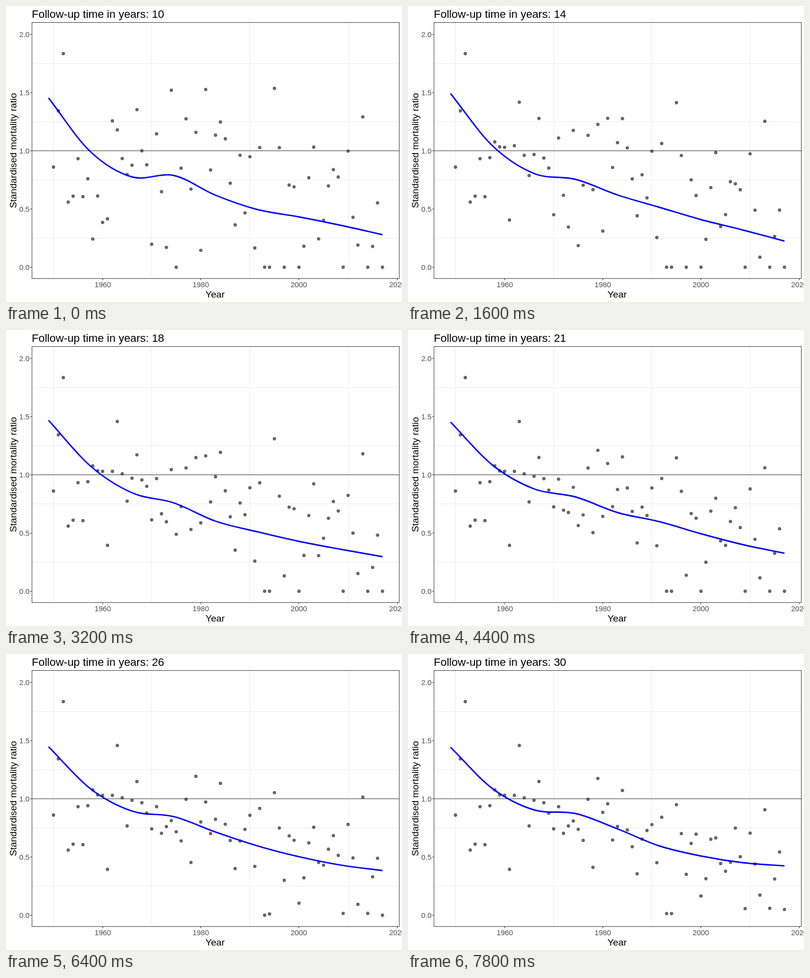
Write an HTML page that moves like this. It is 800 px wide and 600 px high and loops after 8 s.

```html
<!DOCTYPE html>
<html lang="en">
<head>
<meta charset="utf-8">
<title>Mortality ratio by follow-up time</title>
<style>
  html, body { margin: 0; width: 100%; height: 100%; overflow: hidden; background: #fff; }
  svg { display: block; width: 800px; height: 600px; font-family: "Liberation Sans", Arial, sans-serif; }
  .grid { stroke: #ebebeb; }
  .tick { stroke: #333; }
  .label { font-size: 14.93px; fill: #4d4d4d; }
  .axis { font-size: 19.2px; text-anchor: middle; }
  #title { font-size: 22.4px; }
  #trend { fill: none; stroke: #00f; stroke-width: 2.9; stroke-linejoin: round; }
</style>
</head>
<body>
<svg viewBox="0 0 800 600">
  <g id="grid"></g>
  <g id="dots"></g>
  <path d="M53 293.5H794" stroke="#333"/>
  <path id="trend"/>
  <rect x="52.5" y="33.5" width="742" height="519" fill="none" stroke="#333"/>
  <g id="scales"></g>
  <text id="title" x="52" y="24"></text>
  <text class="axis" x="422.5" y="591">Year</text>
  <text class="axis" transform="translate(21 293) rotate(-90)">Standardised mortality ratio</text>
</svg>
<script>
const LOOP = 8000, STEP = 200, MS_PER_YEAR = 400;
const FIRST = 1950, LAST = 2017, TREND_START = 1949, KNOT_GAP = 8.5;
const ZERO_Y = 529.5;
const el = id => document.getElementById(id);
const lerp = (a, b, k) => a + (b - a) * k;
const xOf = year => 195.1 + (year - 1960) * 9.92;
const yOf = ratio => ZERO_Y - ratio * 236;
const pixel = v => Math.floor(v) + 0.5;

function add(parent, tag, attrs, text = "") {
  const node = document.createElementNS("http://www.w3.org/2000/svg", tag);
  for (const key in attrs) node.setAttribute(key, attrs[key]);
  node.textContent = text;
  return parent.appendChild(node);
}

// Fixed parts of the chart
for (const year of [1950, 1970, 1990, 2010])
  add(el("grid"), "path", { class: "grid", d: `M${pixel(xOf(year))} 34V552` });
for (const ratio of [0.25, 0.75, 1.25, 1.75])
  add(el("grid"), "path", { class: "grid", d: `M53 ${yOf(ratio)}H794` });
for (const year of [1960, 1980, 2000, 2020]) {
  const x = pixel(xOf(year));
  add(el("scales"), "path", { class: "tick", d: `M${x} 553V556` });
  add(el("scales"), "text", { class: "label", x, y: 570, "text-anchor": "middle" }, year);
}
for (const ratio of [0, 0.5, 1, 1.5, 2]) {
  const y = yOf(ratio);
  add(el("scales"), "path", { class: "tick", d: `M49 ${y}H52` });
  add(el("scales"), "text", { class: "label", x: 47.5, y: y + 5.5, "text-anchor": "end" }, ratio.toFixed(1));
}

// Trend: key heights at evenly spaced years
const trendKeys = [
  { time: 0, ys: [186.5, 295, 346.5, 343.5, 383.5, 412.5, 427.5, 444.5, 463.5] },
  { time: 1600, ys: [177.5, 283, 339.5, 351.5, 383, 408, 433, 454, 476.5] },
  { time: 3200, ys: [183, 275.5, 330, 350.5, 387.5, 409, 428.5, 444.5, 459.5] },
  { time: 4400, ys: [186.5, 273.5, 322, 338.5, 370, 388.5, 413, 435, 452.5] },
  { time: 7800, ys: [189, 272.5, 316, 323.5, 354.5, 389, 409.5, 423, 429.5] }
];

function trendAt(time) {
  const next = Math.max(1, trendKeys.findIndex(key => key.time >= time));
  const a = trendKeys[next - 1], b = trendKeys[next];
  return a.ys.map((y, i) => lerp(y, b.ys[i], (time - a.time) / (b.time - a.time)));
}

function curve(ys) {
  const last = ys.length - 1, dx = xOf(KNOT_GAP) - xOf(0);
  const slope = i => {
    const before = Math.max(0, i - 1), after = Math.min(last, i + 1);
    return (ys[after] - ys[before]) / (after - before);
  };
  let x = xOf(TREND_START), d = `M${x} ${ys[0]}`;
  for (let i = 0; i < last; i++, x += dx)
    d += `C${x + dx / 3} ${ys[i] + slope(i) / 3} ${x + dx * 2 / 3} ${ys[i + 1] - slope(i + 1) / 3} ${x + dx} ${ys[i + 1]}`;
  return d;
}

// Seeded noise
let seed = 1950;
function random() {
  seed = (Math.imul(seed, 1664525) + 1013904223) >>> 0;
  return seed / 2 ** 32;
}
const normal = () => 2 * (random() + random() + random() - 1.5);

// Dots: the early years rest at known heights, later ones scatter about the trend.
// Each year drifts to its rest and stays once the follow-up covers it.
const earlyRest = [
  326, 212, 96, 397, 385, 309, 386, 307, 275, 285, 286, 436, 286,
  185, 291, 348, 296, 258, 301, 322, 354, 309, 363, 348, 338
];
const finalTrend = trendKeys[trendKeys.length - 1].ys;

function restAt(year) {
  const knot = (year - TREND_START) / KNOT_GAP;
  const i = Math.min(Math.floor(knot), finalTrend.length - 2);
  return lerp(finalTrend[i], finalTrend[i + 1], knot - i) + 45 * normal();
}

const dots = [];
for (let year = FIRST; year <= LAST; year++) {
  dots.push({
    node: add(el("dots"), "circle", { cx: xOf(year), r: 3.4, "fill-opacity": 0.6 }),
    rest: earlyRest[year - FIRST] ?? restAt(year),
    away: 95 * normal(),
    phase: 2 * Math.PI * random(),
    settle: Math.max(0, (year - 1956) * MS_PER_YEAR)
  });
}

function dotHeight({ rest, away, phase, settle }, time) {
  const left = settle > time ? 1 - time / settle : 0;
  const wobble = 14 * Math.sin(phase + time / MS_PER_YEAR);
  return Math.min(ZERO_Y, rest + 0.5 + away * left ** 2 + wobble * left);
}

function draw(step) {
  const time = step * STEP;
  for (const dot of dots) dot.node.setAttribute("cy", dotHeight(dot, time));
  el("trend").setAttribute("d", curve(trendAt(time)));
  el("title").textContent = "Follow-up time in years: " + (10 + Math.ceil(time / MS_PER_YEAR));
}

const start = performance.now();
let shown = -1;
function tick() {
  const step = Math.floor(((performance.now() - start) % LOOP) / STEP);
  if (step !== shown) draw(shown = step);
  requestAnimationFrame(tick);
}
tick();
</script>
</body>
</html>
```
